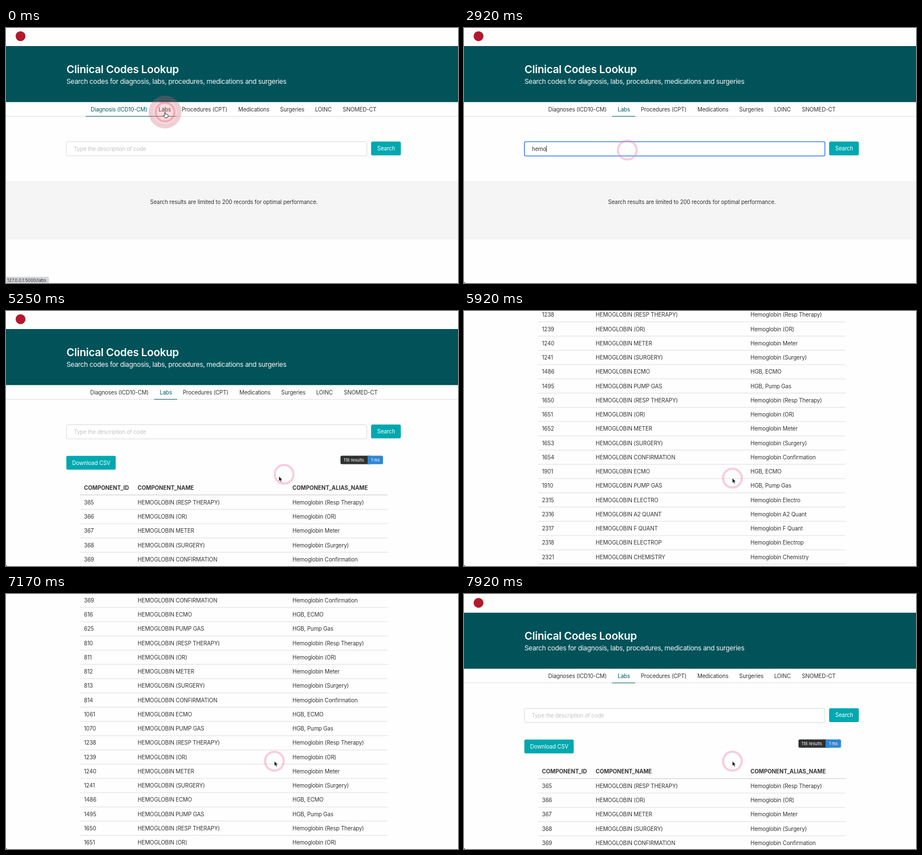
Animation, 800 px wide and 452 px high, one loop 8 s. Source, as an HTML page:

```html
<!DOCTYPE html>
<html lang="en">
<head>
<meta charset="utf-8">
<title>Clinical Codes Lookup</title>
<style>
  html, body { margin: 0; width: 100%; height: 100%; overflow: hidden; background: #fefefe; }
  svg { display: block; width: 100vw; height: 100vh; }
  text { font: 9.8px Inter, "Open Sans", sans-serif; letter-spacing: -.014em; fill: #363636; white-space: pre; }
  .title { font-size: 19px; font-weight: 600; letter-spacing: -.014em; fill: #fff; }
  .sub { font-size: 12px; letter-spacing: -.028em; fill: #f4f9f9; }
  .head { font-weight: 700; letter-spacing: 0; }
  .light { fill: #fff; }
  .tag { font-size: 7.5px; letter-spacing: -.005em; fill: #fff; }
  .status { font-size: 7.8px; letter-spacing: 0; fill: #333; }
  .hint { letter-spacing: -.02em; fill: #c2c4c6; }
  .on { fill: #015c61; }
</style>
</head>
<body>
<svg id="stage" viewBox="0 0 800 452" xmlns="http://www.w3.org/2000/svg"></svg>
<script>
const LOOP = 8000, LOAD_LABS = 330, FOCUS = 1150, TYPE = 2420, KEY = 150, SUBMIT = 4480, LOAD_RESULTS = 5080;
const QUERY = "hemoglobin";
const TEAL = "#015259", AQUA = "#00a8af", LINE = "#dbdbdb", PRESS = "#e2586a";

const text = (x, mid, s, cls = "", half = 3.6) => `<text x="${x}" y="${mid + half}" class="${cls}">${s}</text>`;
const rect = (x, y, w, h, fill, r = 0) => `<rect x="${x}" y="${y}" width="${w}" height="${h}" rx="${r}" fill="${fill}"/>`;
const group = (id, body) => `<g id="${id}">${body}</g>`;

function tabs(first, xs, active) {
  const names = [first, "Labs", "Procedures (CPT)", "Medications", "Surgeries", "LOINC", "SNOMED-CT"];
  return names.map((n, i) => text(xs[i], 144, n, i === active ? "on" : "")).join("");
}

// Component IDs repeat in blocks; each kind has an upper-case name and an alias.
const KINDS = {
  r: "Hemoglobin (Resp Therapy)", o: "Hemoglobin (OR)", m: "Hemoglobin Meter", s: "Hemoglobin (Surgery)",
  c: "Hemoglobin Confirmation", e: "HGB, ECMO", p: "HGB, Pump Gas", l: "Hemoglobin Electro",
  a: "Hemoglobin A2 Quant", f: "Hemoglobin F Quant", t: "Hemoglobin Electrop", h: "Hemoglobin Chemistry"
};
const block = (id, five = true) => [..."romsc"].slice(0, five ? 5 : 4).map((k, i) => [id + i, k]);
const ROWS = [
  ...block(365), [616, "e"], [625, "p"],
  ...block(810), [1061, "e"], [1070, "p"],
  ...block(1238, false), [1486, "e"], [1495, "p"],
  ...block(1650), [1901, "e"], [1910, "p"],
  ...[..."laft"].map((k, i) => [2315 + i, k]), [2321, "h"]
];

function table() {
  const head = text(138, 313.6, "COMPONENT_ID", "head") + text(233, 313.6, "COMPONENT_NAME", "head") +
    text(507, 313.6, "COMPONENT_ALIAS_NAME", "head") + rect(131, 325.4, 544, 1.3, "#d2d4d4");
  return head + ROWS.map(([id, kind], i) => {
    const y = 339.2 + i * 25.25, alias = KINDS[kind];
    const name = alias.replace("HGB,", "Hemoglobin").toUpperCase();
    return text(138, y, id) + text(233, y, name) + text(507, y, alias) + rect(131, y + 12.1, 544, .9, LINE);
  }).join("");
}

const page =
  `<circle cx="25.7" cy="14.5" r="8.7" fill="#b3182c"/>` +
  rect(0, 32, 800, 99.3, TEAL) +
  text(107, 73.2, "Clinical Codes Lookup", "title", 6.9) +
  text(107, 94.4, "Search codes for diagnosis, labs, procedures, medications and surgeries", "sub", 4.3) +
  rect(0, 156, 800, .8, LINE) +
  group("tabsOld", tabs("Diagnosis (ICD10-CM)", [150, 270, 311, 411, 485, 547, 596], 0) +
    rect(141, 156, 119.5, .9, TEAL) + rect(260.5, 156, 41, .9, "#4a4a4a")) +
  group("tabsNew", tabs("Diagnoses (ICD10-CM)", [149, 272, 313, 413, 487, 549, 598], 1) +
    rect(262, 156, 41, .9, TEAL)) +
  `<rect id="box" x="107" y="201.5" width="531.7" height="25.2" rx="2.5" fill="#fff"/>` +
  group("hint", text(120, 214.4, "Type the description of code", "hint")) +
  `<text id="typed" x="120" y="218"/>` +
  `<rect id="caret" y="208.5" width=".9" height="11.5" fill="#222"/>` +
  rect(646.2, 201.2, 52.6, 24.6, AQUA, 2.5) + text(657, 213.7, "Search", "light") +
  group("notice", rect(0, 271, 800, 104, "#f5f5f5") +
    text(255, 308.6, "Search results are limited to 200 records for optimal performance.")) +
  group("results", rect(106.8, 256.7, 87.4, 24.6, AQUA, 2.5) + text(117, 269, "Download CSV", "light") +
    rect(592, 256.6, 52, 14.8, "#2f3030", 2.5) + rect(640, 256.6, 27.3, 14.8, "#2f86d3", 2.5) +
    rect(640, 256.6, 6, 14.8, "#2f86d3") +
    text(597.5, 264, "118 results", "tag", 2.7) + text(646, 264, "1 ms", "tag", 2.7) + table());

const overlay =
  `<path d="M0 450V452H2Z" fill="#333"/>` +
  group("status", `<path d="M0 441H73Q76 441 76 444V452H0Z" fill="#d3d5d9"/>` +
    text(2, 447.4, "127.0.0.1:5000/labs", "status", 2.8)) +
  group("halo",
    `<g id="ripple"><circle id="disc" fill="${PRESS}" fill-opacity=".2"/>` +
    `<circle id="rim" fill="none" stroke="#b08080" stroke-opacity=".14" stroke-width="8"/></g>` +
    `<circle id="ring" r="16.6" fill="none" stroke-width="3.8" stroke-opacity=".42"/>`) +
  group("pointer",
    `<path id="arrow" d="M0 0V8.6L2 6.8L3.4 10L5 9.3L3.6 6.2H6.2Z" fill="#111" stroke="#fff" stroke-width=".6"/>` +
    `<path id="hand" d="M-.8 1Q0-.6 .8 1V4Q1.8 3.2 2.5 4.2Q3.4 3.6 4 4.6Q5 4.2 5.4 5.4V7.2L4.4 10H-.6L-3.6 6.4Q-3.2 5.2-2 5.8L-.8 6.8Z" fill="#fff" stroke="#111" stroke-width=".8"/>` +
    `<path id="beam" d="M-1.8-5Q0-5 0-4Q0-5 1.8-5M0-4V4M-1.8 5Q0 5 0 4Q0 5 1.8 5" fill="none" stroke="#222" stroke-width=".8"/>`);

document.getElementById("stage").innerHTML = group("page", page) + overlay;
const el = {};
document.querySelectorAll("[id]").forEach(n => el[n.id] = n);

const set = (node, attrs) => { for (const k in attrs) node.setAttribute(k, attrs[k]); };
const show = (node, on) => node.setAttribute("visibility", on ? "visible" : "hidden");
const ease = p => p < .5 ? 4 * p ** 3 : 1 - 4 * (1 - p) ** 3;

// Pointer legs: start, duration, target x and y, dip below the straight line.
const LEGS = [[450, 450, 289, 216.5, 0], [3850, 400, 675, 216, 10], [5000, 320, 475, 296.3, 0]];
function pointerAt(t) {
  let x = 281.5, y = 149;
  for (const [start, dur, tx, ty, dip] of LEGS) {
    if (t < start) break;
    const p = ease(Math.min(1, (t - start) / dur));
    x += (tx - x) * p;
    y += (ty - y) * p + dip * Math.sin(Math.PI * p);
  }
  return [x, y];
}

// Scroll offsets over time, joined by a monotone cubic.
const SCROLL = [[5360, 0], [5450, 110], [5600, 430], [5750, 640], [5830, 675], [5920, 686], [6330, 687.2],
  [6580, 687.2], [6830, 685.4], [7000, 610], [7170, 430], [7330, 256], [7500, 121], [7650, 20],
  [7740, -4], [7920, -1.2], [8000, -.6]];
const slope = i => (SCROLL[i + 1][1] - SCROLL[i][1]) / (SCROLL[i + 1][0] - SCROLL[i][0]);
function tangent(i) {
  if (i === 0 || i === SCROLL.length - 1) return 0;
  const a = slope(i - 1), b = slope(i);
  return a * b > 0 ? 2 * a * b / (a + b) : 0;
}
function scrollAt(t) {
  if (t <= SCROLL[0][0]) return 0;
  const i = SCROLL.findIndex(k => k[0] > t) - 1;
  const [t0, a] = SCROLL[i], [t1, b] = SCROLL[i + 1], h = t1 - t0, u = (t - t0) / h;
  return a + (b - a) * u * u * (3 - 2 * u) +
    h * u * (1 - u) * (tangent(i) * (1 - u) - tangent(i + 1) * u);
}

function drawClick(t) {
  const age = Math.min(...[-150, FOCUS, SUBMIT].map(c => t - c).filter(a => a >= 0));
  const active = age < 430;
  const r = 17 + 12 * Math.min(1, age / 150);
  show(el.ripple, active);
  set(el.ripple, { opacity: active ? 1 - Math.max(0, age - 200) / 230 : 0 });
  set(el.disc, { r });
  set(el.rim, { r: r - 4 });
  set(el.ring, { stroke: active && age < 300 ? "#ee6478" : "#f184b6" });
}

function render(t) {
  const loaded = t >= LOAD_LABS, results = t >= LOAD_RESULTS;
  const focused = t >= FOCUS && t < SUBMIT;
  const count = results || t < TYPE ? 0 : Math.min(QUERY.length, 1 + Math.floor((t - TYPE) / KEY));

  show(el.tabsOld, !loaded);
  show(el.tabsNew, loaded);
  show(el.status, !loaded);
  show(el.notice, !results);
  show(el.results, results);
  show(el.hint, count === 0);
  set(el.box, { stroke: focused ? "#4884e4" : "#d8dadb", "stroke-width": focused ? 1.6 : 1 });

  el.typed.textContent = QUERY.slice(0, count);
  const typing = t >= TYPE && t < TYPE + KEY * QUERY.length;
  show(el.caret, focused && (typing || (t - FOCUS) % 1000 < 500));
  set(el.caret, { x: 120 + (count ? el.typed.getComputedTextLength() : 0) });
  set(el.page, { transform: `translate(0 ${-scrollAt(t)})` });

  const [x, y] = pointerAt(t), [hx, hy] = pointerAt(t - 20);
  set(el.pointer, { transform: `translate(${x} ${y})` });
  set(el.halo, { transform: `translate(${hx} ${hy})` });
  drawClick(t);

  const hidden = t >= TYPE && t < LEGS[1][0];
  const overInput = y > 201 && y < 227 && x < 639;
  const hand = !results && (y < 157 || x > 646);
  show(el.hand, hand);
  show(el.beam, !hand && !results && overInput && !hidden);
  show(el.arrow, results || (!hand && !overInput));
}

const begin = performance.now();
function tick() {
  render(Math.max(0, performance.now() - begin) % LOOP);
  requestAnimationFrame(tick);
}
tick();
</script>
</body>
</html>
```
